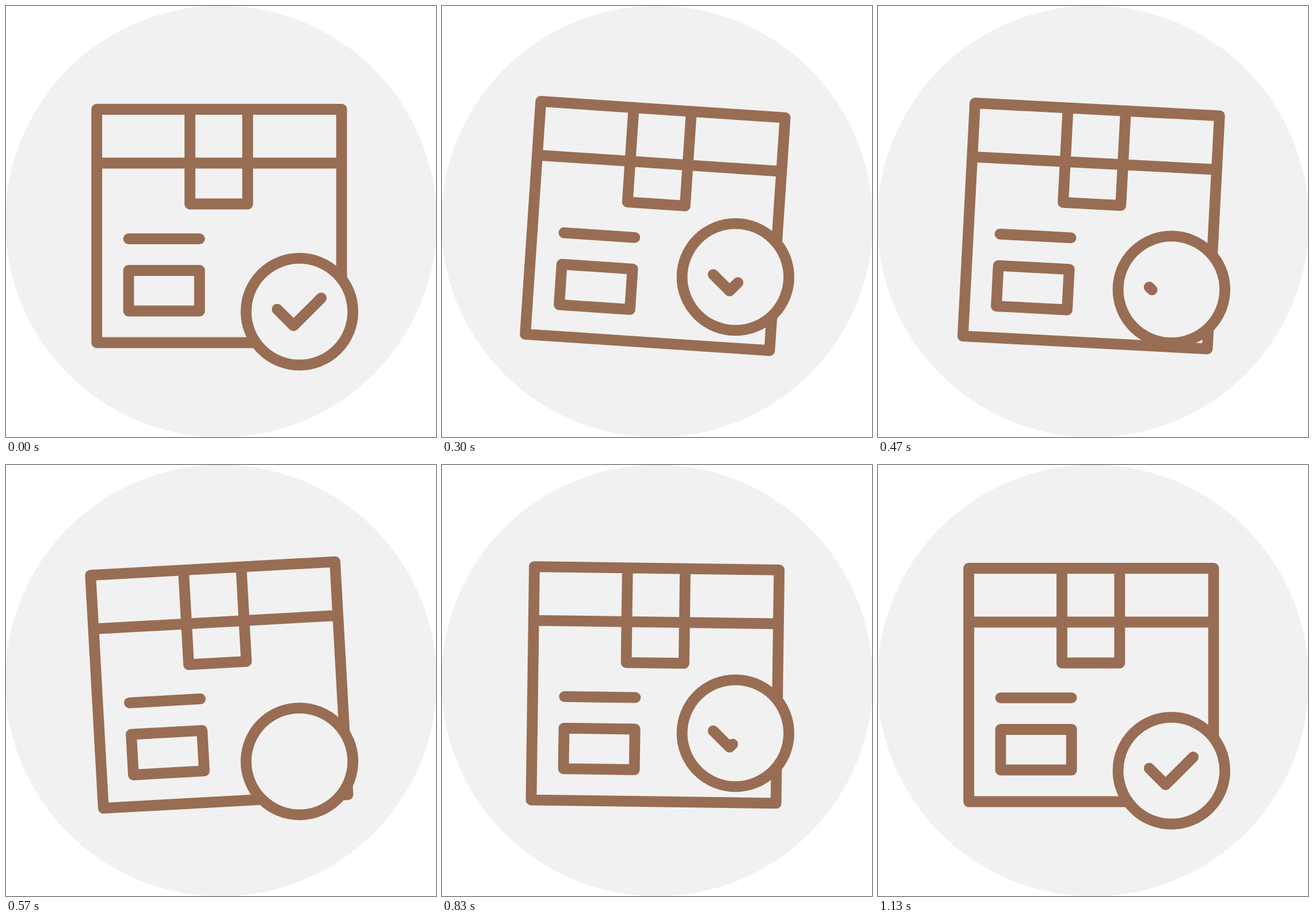
These frames come from a looping animation (747x749 px, 1.67 s). An HTML page:

```html
<!DOCTYPE html>
<html lang="en">
<head>
<meta charset="utf-8">
<title>Parcel confirmed</title>
<style>
  html, body { margin: 0; width: 100%; height: 100%; overflow: hidden; background: #fff; }
  svg { display: block; width: 100vw; height: 100vh; }
  .line { fill: none; stroke: #986d53; stroke-width: 18.8; stroke-linecap: round; stroke-linejoin: round; }
  .disc { fill: #f1f1f1; }
</style>
</head>
<body>
<svg viewBox="0 0 747 749">
  <circle class="disc" cx="373.5" cy="374.5" r="375"/>
  <g id="box" class="line">
    <path d="M157.7 179.5H583V585H157.7ZM157.7 273H583M319.5 179.5V344H419.8V179.5"/>
    <path d="M213 404.6H336.2M213 459.5H336.2V530H213Z"/>
  </g>
  <g id="badge">
    <circle class="line disc" r="92.8" style="fill:#f1f1f1"/>
    <path id="check" class="line" d="M-38.7 -4.2L-10.2 24.3L37.8 -23.7"/>
  </g>
</svg>
<script>
  const LOOP = 1670, FPS = 30, LAST_STEP = 34;

  // Keys are [step, value], eased in and out between neighbours.
  const TILT = [[2, 0], [12.2, 5], [18.1, -4], [24.3, 0.8], [34, 0]];
  const BADGE_Y = [[2, 531.2], [10, 468.2], [18, 517.2], [26, 463.8], [34, 531.2]];
  const CHECK = [[3.1, 1], [16, 0], [19, 0], [32, 1]];

  const box = document.getElementById('box');
  const badge = document.getElementById('badge');
  const check = document.getElementById('check');
  const checkLength = check.getTotalLength();

  const ease = x => x * x * (3 - 2 * x);

  function valueAt(keys, step) {
    if (step <= keys[0][0]) return keys[0][1];
    for (let i = 1; i < keys.length; i++) {
      const [start, from] = keys[i - 1], [end, to] = keys[i];
      if (step <= end) return from + (to - from) * ease((step - start) / (end - start));
    }
    return keys[keys.length - 1][1];
  }

  function render(ms) {
    const step = Math.min(LAST_STEP, Math.floor((ms + 3.5) * FPS / 1000));
    const shown = valueAt(CHECK, step);
    box.setAttribute('transform', `rotate(${valueAt(TILT, step)} 370.5 382.4)`);
    badge.setAttribute('transform', `translate(509.8 ${valueAt(BADGE_Y, step)})`);
    check.setAttribute('visibility', shown > 0 ? 'visible' : 'hidden');
    check.setAttribute('stroke-dasharray', shown < 1 ? `${shown * checkLength} 300` : 'none');
  }

  const begin = performance.now();
  function tick() {
    render((performance.now() - begin) % LOOP);
    requestAnimationFrame(tick);
  }
  tick();
</script>
</body>
</html>
```
